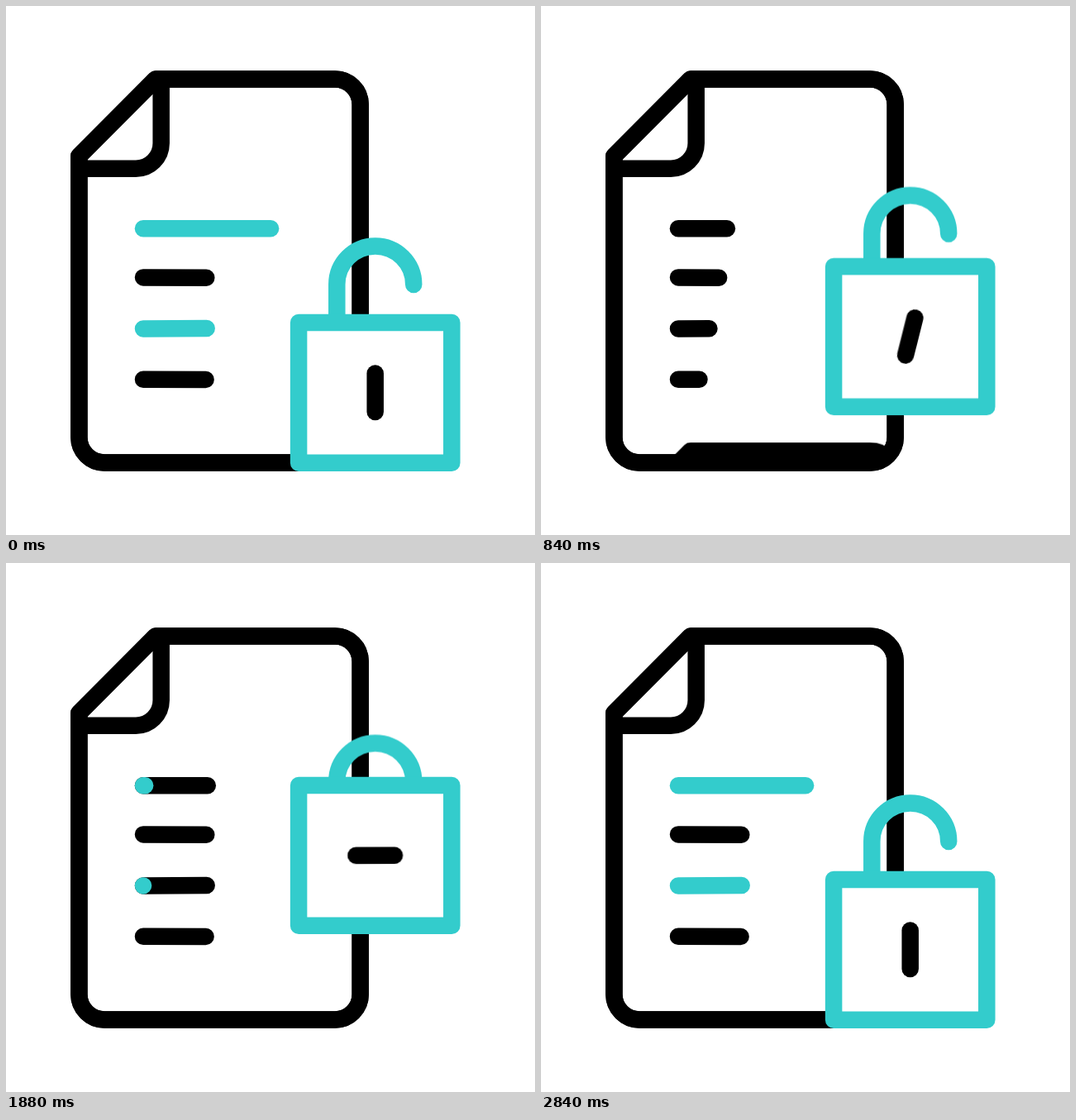
These frames come from a looping animation (640x640 px, 3000 ms). An HTML page:

```html
<!DOCTYPE html>
<html lang="en">
<head>
<meta charset="utf-8">
<title>Document unlocking</title>
<style>
html, body { margin: 0; height: 100%; overflow: hidden; background: #fff; }
svg { display: block; width: 100vw; height: 100vh; }
svg { fill: none; stroke: #000; stroke-width: 20.5; stroke-linecap: round; stroke-linejoin: round; }
.teal { stroke: #3cc; }
.paper { fill: #fff; }
.fold { stroke-linecap: butt; }
.draw { stroke-dasharray: 1 3; }

/* Cubic ease-in for the first half of a move; each midpoint switches to ease-out. */
.sheet, .lock, .shackle, .keyhole, .draw {
  animation: 3s cubic-bezier(.3333, 0, .6667, 0) infinite both;
}
.sheet { animation-name: slide; }
.lock { animation-name: lift; }
.shackle { animation-name: close; }
.keyhole { animation-name: turn; transform-origin: 446.7px 467.8px; }
.shrink { animation-name: shrink; }
.first { animation-name: first; }
.grow { animation-name: grow; }
.tint1 { animation-name: tint1; }
.tint3 { animation-name: tint3; }
.under { animation: under 3s step-end infinite; }
.over { animation: over 3s step-end infinite; }

@keyframes slide {
  0%, 9.93% { transform: translateY(0); }
  22.1% { transform: translateY(241px); animation-timing-function: cubic-bezier(.3333, 1, .6667, 1); }
  34.27%, 100% { transform: translateY(482px); }
}
@keyframes lift {
  0%, 13.87% { transform: translateY(0); }
  27.13% { transform: translateY(-57px); animation-timing-function: cubic-bezier(.3333, 1, .6667, 1); }
  40.4%, 62.97% { transform: translateY(-114px); }
  76.38% { transform: translateY(-57px); animation-timing-function: cubic-bezier(.3333, 1, .6667, 1); }
  89.8%, 100% { transform: translateY(0); }
}
@keyframes close {
  0%, 19.5% { transform: translateY(0); }
  32.08% { transform: translateY(20.75px); animation-timing-function: cubic-bezier(.3333, 1, .6667, 1); }
  44.67%, 61.23% { transform: translateY(41.5px); }
  73.82% { transform: translateY(20.75px); animation-timing-function: cubic-bezier(.3333, 1, .6667, 1); }
  86.4%, 100% { transform: translateY(0); }
}
@keyframes turn {
  0%, 19.5% { transform: rotate(0deg); }
  32.08% { transform: rotate(45deg); animation-timing-function: cubic-bezier(.3333, 1, .6667, 1); }
  44.67%, 61.23% { transform: rotate(90deg); }
  73.82% { transform: rotate(45deg); animation-timing-function: cubic-bezier(.3333, 1, .6667, 1); }
  86.4%, 100% { transform: rotate(0deg); }
}
@keyframes shrink {
  0%, 9.93% { stroke-dashoffset: 0; }
  16.53% { stroke-dashoffset: .25; animation-timing-function: cubic-bezier(.3333, 1, .6667, 1); }
  23.13%, 100% { stroke-dashoffset: .5; }
}
@keyframes first {
  0%, 13.17% { stroke-dashoffset: 1; }
  25.33% { stroke-dashoffset: .75; animation-timing-function: cubic-bezier(.3333, 1, .6667, 1); }
  37.5%, 60% { stroke-dashoffset: .5; }
  70.13% { stroke-dashoffset: .25; animation-timing-function: cubic-bezier(.3333, 1, .6667, 1); }
  80.3%, 100% { stroke-dashoffset: 0; }
}
@keyframes grow {
  0%, 13.17% { stroke-dashoffset: 1; }
  25.33% { stroke-dashoffset: .5; animation-timing-function: cubic-bezier(.3333, 1, .6667, 1); }
  37.5%, 100% { stroke-dashoffset: 0; }
}
@keyframes tint1 {
  0%, 59.33% { stroke-dashoffset: 1; }
  70.4% { stroke-dashoffset: .5; animation-timing-function: cubic-bezier(.3333, 1, .6667, 1); }
  81.5%, 100% { stroke-dashoffset: 0; }
}
@keyframes tint3 {
  0%, 61.07% { stroke-dashoffset: 1; }
  73.23% { stroke-dashoffset: .5; animation-timing-function: cubic-bezier(.3333, 1, .6667, 1); }
  85.4%, 100% { stroke-dashoffset: 0; }
}
@keyframes under { 0% { visibility: visible; } 86.7%, 100% { visibility: hidden; } }
@keyframes over { 0% { visibility: hidden; } 61.2%, 100% { visibility: visible; } }
</style>
</head>
<body>
<svg viewBox="0 0 640 640">
  <defs>
    <path id="outline" d="M88.4 181.5 181 88.5H398a30.7 30.7 0 0 1 30.7 30.7V521.7a30.7 30.7 0 0 1-30.7 30.7H119.1a30.7 30.7 0 0 1-30.7-30.7Z"/>
    <path id="fold" d="M187.7 88.5V166a30.7 30.7 0 0 1-30.7 30.7H88.4"/>
    <path id="row1" pathLength="1" d="M166 269.3H320.1"/>
    <path id="row2" pathLength="1" d="M166 328.4 242.3 328.8"/>
    <path id="row3" pathLength="1" d="M166 390.4 242.7 390"/>
    <path id="row4" pathLength="1" d="M166 451.7 241.6 452"/>
    <clipPath id="page"><use href="#outline"/></clipPath>
  </defs>

  <!-- new page, revealed as the old one slides away -->
  <use href="#outline" class="paper"/>
  <use href="#fold" class="fold"/>
  <g class="under">
    <use href="#row1" class="draw first"/>
    <use href="#row3" class="draw grow" style="animation-delay: 84ms"/>
  </g>
  <use href="#row2" class="draw grow" style="animation-delay: 42ms"/>
  <use href="#row4" class="draw grow" style="animation-delay: 126ms"/>
  <g class="over teal">
    <use href="#row1" class="draw tint1"/>
    <use href="#row3" class="draw tint3"/>
  </g>

  <!-- old page -->
  <g clip-path="url(#page)">
    <g class="sheet">
      <use href="#outline" class="paper"/>
      <use href="#fold" class="fold"/>
      <use href="#row1" class="teal draw shrink"/>
      <use href="#row2"/>
      <use href="#row3" class="teal"/>
      <use href="#row4"/>
    </g>
  </g>
  <use href="#outline"/>

  <g class="lock">
    <path class="teal shackle" d="M400.3 383V336.9a46.45 46.45 0 0 1 92.9 0"/>
    <rect class="teal paper" x="354.1" y="383" width="185.2" height="169.7"/>
    <path class="keyhole" d="M446.7 444.6V491"/>
  </g>
</svg>
</body>
</html>
```
